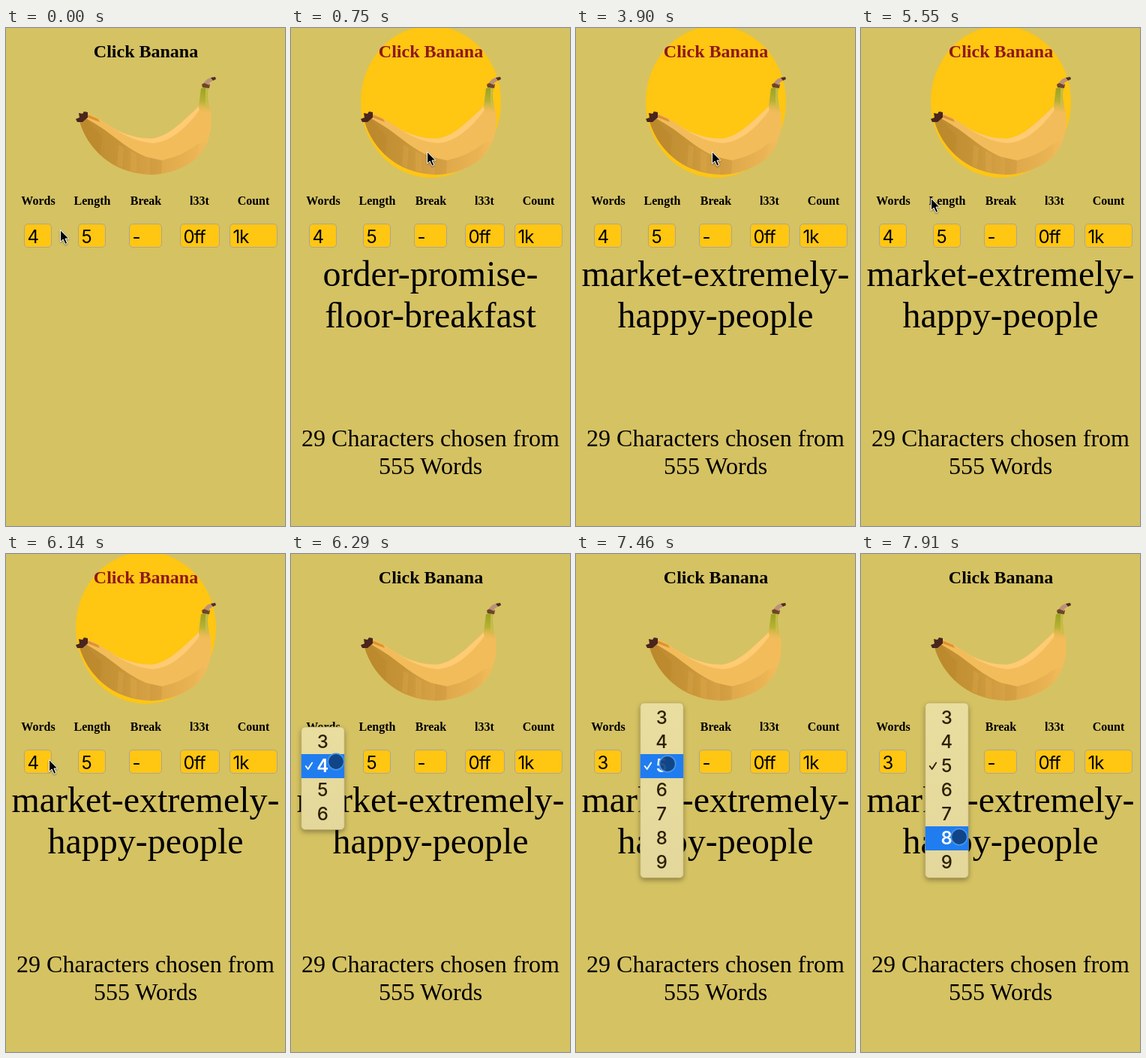
Animation of 372 by 662 pixels, one loop 8000 ms. Source, as an HTML page:

```html
<!DOCTYPE html>
<html lang="en">
<head>
<meta charset="utf-8">
<title>Click Banana</title>
<style>
html, body { margin: 0; width: 100%; height: 100%; overflow: hidden; background: #d5c263; }
svg { display: block; width: 372px; height: 662px; }
text { font-family: "Liberation Serif", Times, serif; }
.mid { text-anchor: middle; }
.title { font-size: 24px; font-weight: bold; }
.head { font-size: 16px; font-weight: bold; }
.big { font-size: 48px; }
.note { font-size: 32px; }
.ui { font-family: Inter, Roboto, sans-serif; font-size: 24px; letter-spacing: -.04em; }
.menu { filter: drop-shadow(0 3px 3px rgba(0, 0, 0, .32)); }
.menu .ui { font-weight: 500; letter-spacing: 0; fill: #2b2004; }
.menu .ui.on { font-weight: 600; fill: #fff; }
.tick { fill: none; stroke: #2b2004; stroke-width: 1.9; stroke-linecap: round; stroke-linejoin: round; }
.tick.on { stroke: #fff; }
</style>
</head>
<body>
<svg viewBox="0 0 372 662">
  <defs>
    <linearGradient id="under" gradientUnits="userSpaceOnUse" x1="97" x2="272" y1="0" y2="0">
      <stop offset="0" stop-color="#bd8a2f"/>
      <stop offset=".3" stop-color="#c69437"/>
      <stop offset=".6" stop-color="#dba548"/>
      <stop offset="1" stop-color="#f3bc5b"/>
    </linearGradient>
    <linearGradient id="neck" gradientUnits="userSpaceOnUse" x1="266" x2="262" y1="80" y2="116">
      <stop offset="0" stop-color="#99a322"/>
      <stop offset=".5" stop-color="#b9b234"/>
      <stop offset="1" stop-color="#f3bc5b" stop-opacity="0"/>
    </linearGradient>
    <linearGradient id="sheet" x2="0" y2="1">
      <stop offset="0" stop-color="#e9dd9f"/>
      <stop offset="1" stop-color="#e4d79b"/>
    </linearGradient>
  </defs>
  <rect width="372" height="662" fill="#d5c263"/>
  <ellipse id="halo" cx="186.5" cy="98" rx="93.5" ry="101"/>

  <g id="banana">
    <path fill="#f3bc5b" d="M98 124 108 113C122 118 136 129 150 137Q171 147 194 147C215 145 233 127 257 104L260 80 270 79C267 92 271 103 273 112C276 134 270 158 254 173C238 187 214 195 192 195C168 194 145 186 128 171C113 157 104 143 98 124Z"/>
    <path fill="#ffcb73" d="M140 131 150 137Q171 147 194 147C215 145 233 127 257 104L258 109C240 133 220 151 196 153Q168 151 140 131Z"/>
    <path fill="url(#under)" d="M98 124 105 119Q119 127 131 135L155 153Q170 164 186 171L208 176Q236 170 256 154L268 150Q263 165 254 173C238 187 214 195 192 195C168 194 145 186 128 171C113 157 104 143 98 124Z"/>
    <path fill="#b98629" opacity=".45" d="M98 124 105 119Q117 134 128 143L126 169Q106 151 98 124Z"/>
    <path fill="#e3ae50" opacity=".25" d="M150 155 157 159 155 186 148 183ZM166 163 174 168 174 192 166 190ZM208 176Q236 170 256 154L254 173Q234 190 207 194Z"/>
    <path fill="#b8842c" opacity=".18" d="M192 173 208 176 207 194 192 195Z"/>
    <path fill="#df922d" d="M109 115 123 121 125 125 109 119Z"/>
    <path fill="url(#neck)" d="M260 80 270 79C267 92 271 103 272 112L258 119 257 104Z"/>
    <path fill="#cbc150" opacity=".8" d="M266 80 270 79Q267 92 270 104L266 105Z"/>
    <path fill="#49251d" d="M93 121 98 119 97 113 102 114 104 111 109 112 109 119 102 125 95 125Z"/>
    <path fill="#704527" d="M261 75 266 72 272 75 271 80 262 79Z"/>
    <path fill="#ba927a" d="M264 73Q268 66 275 66L277 69 271 73 271 76Z"/>
    <path fill="#4f2c20" d="M273 66 279 65 280 68 276 70Z"/>
  </g>

  <text id="title" class="mid title" x="186.5" y="39">Click Banana</text>
  <g id="form"></g>
  <rect id="ring" x="23.5" y="259.5" width="38" height="33" rx="6" fill="none" stroke="#2b6cc4" stroke-width="2"/>
  <g id="result">
    <text id="top" class="mid big" x="186" y="343"></text>
    <text id="bottom" class="mid big" x="186" y="398"></text>
    <text class="mid note" x="186" y="556">29 Characters chosen from</text>
    <text class="mid note" x="186" y="593">555 Words</text>
  </g>
  <g id="words" class="menu"></g>
  <g id="length" class="menu"></g>
  <path id="arrow" fill="#000" stroke="#fff" stroke-width="1" style="filter:drop-shadow(0 1px 1px #0006)" d="M.5.5V16.3L4.1 13 7 19.4 9.7 18.2 7 12H11.8Z"/>
  <circle id="dot" r="10.7" fill="#0e407c" fill-opacity=".9" stroke="#4c96e6" stroke-width="1.6"/>
</svg>
<script>
const LOOP = 8000;
const $ = id => document.getElementById(id);
const show = (id, on) => $(id).style.display = on ? "" : "none";

// time, pointer x, pointer y
const moves = [
  [0, 72, 268], [150, 114, 220], [300, 155, 178], [450, 181, 164],
  [5550, 93, 226], [5700, 54, 256], [5850, 35, 284], [5990, 42, 280],
  [6140, 57, 273], [6290, 60, 276], [6730, 56, 261], [6880, 55, 257],
  [7020, 83, 262], [7170, 123, 268], [7320, 121, 277], [7460, 122, 279],
  [7610, 128, 302], [7760, 130, 363], [7910, 131, 376]
];

// label, label centre, box left, box width, value
const fields = [
  ["Words", 43, 24, 37, "4"], ["Length", 115, 96, 37, "5"], ["Break", 186.5, 164, 44, "-"],
  ["l33t", 258, 232, 53, "0ff"], ["Count", 330, 298, 64, "1k"]
];
$("form").innerHTML = fields.map(([label, mid, x, w, value]) =>
  `<text class="mid head" x="${mid}" y="235">${label}</text>
   <rect x="${x + .5}" y="260.5" width="${w - 1}" height="31" rx="4.5" fill="#ffc612" stroke="#aaa698"/>
   <text class="ui" x="${x + 4.5}" y="285.5">${value}</text>`).join("");
const wordValue = document.querySelector("#form .ui");

function drawMenu(id, x, y, count, checked, active) {
  const h = count * 32 + 8;
  let out = `<rect x="${x}" y="${y}" width="57.5" height="${h + .5}" rx="5" fill="url(#sheet)" stroke="#b9ab68" stroke-width=".7"/>`;
  for (let i = 0; i < count; i++) {
    const top = y + 4 + i * 32, on = i === active ? "on" : "";
    if (on) out += `<rect x="${x}" y="${top}" width="57.5" height="32" fill="#207df0"/>`;
    if (i === checked) out += `<path class="tick ${on}" d="M${x + 6} ${top + 16}l3 4 5.5-8.5"/>`;
    out += `<text class="ui mid ${on}" x="${x + 28.5}" y="${top + 23.5}">${i + 3}</text>`;
  }
  $(id).innerHTML = out;
}

function render(t) {
  const [, x, y] = moves.findLast(m => m[0] <= t);
  const wordsOpen = t >= 6290 && t < 7320, lengthOpen = t >= 7460;
  const touching = t >= 6290 && t < 7020 || lengthOpen;
  const hover = t >= 750 && t < 6290;

  show("halo", hover);
  $("halo").setAttribute("fill", t >= 3750 && t < 3900 ? "#a04c18" : "#ffc612");
  $("title").setAttribute("fill", hover ? "#8f1818" : "#000");

  show("result", t >= 750);
  // \ufb02 is the joined "fl"
  const [top, bottom] = t < 3750 ? ["order-promise-", "\ufb02oor-breakfast"] : ["market-extremely-", "happy-people"];
  $("top").textContent = top;
  $("bottom").textContent = bottom;
  wordValue.textContent = t < 7170 ? "4" : "3";
  show("ring", t >= 7170 && t < 7460);

  show("words", wordsOpen);
  if (wordsOpen) drawMenu("words", 13.7, 230, 4, 1, t < 6730 ? 1 : 0);
  $("words").style.opacity = t < 7170 ? 1 : .4;
  show("length", lengthOpen);
  if (lengthOpen) drawMenu("length", 85.7, 198, 7, 2, [7610, 7760, 7910].filter(s => s <= t).length + 2);

  show("arrow", !touching);
  show("dot", touching);
  for (const id of ["arrow", "dot"]) $(id).setAttribute("transform", `translate(${x} ${y})`);
}

const start = performance.now();
function tick() {
  render((performance.now() - start) % LOOP);
  requestAnimationFrame(tick);
}
tick();
</script>
</body>
</html>
```
